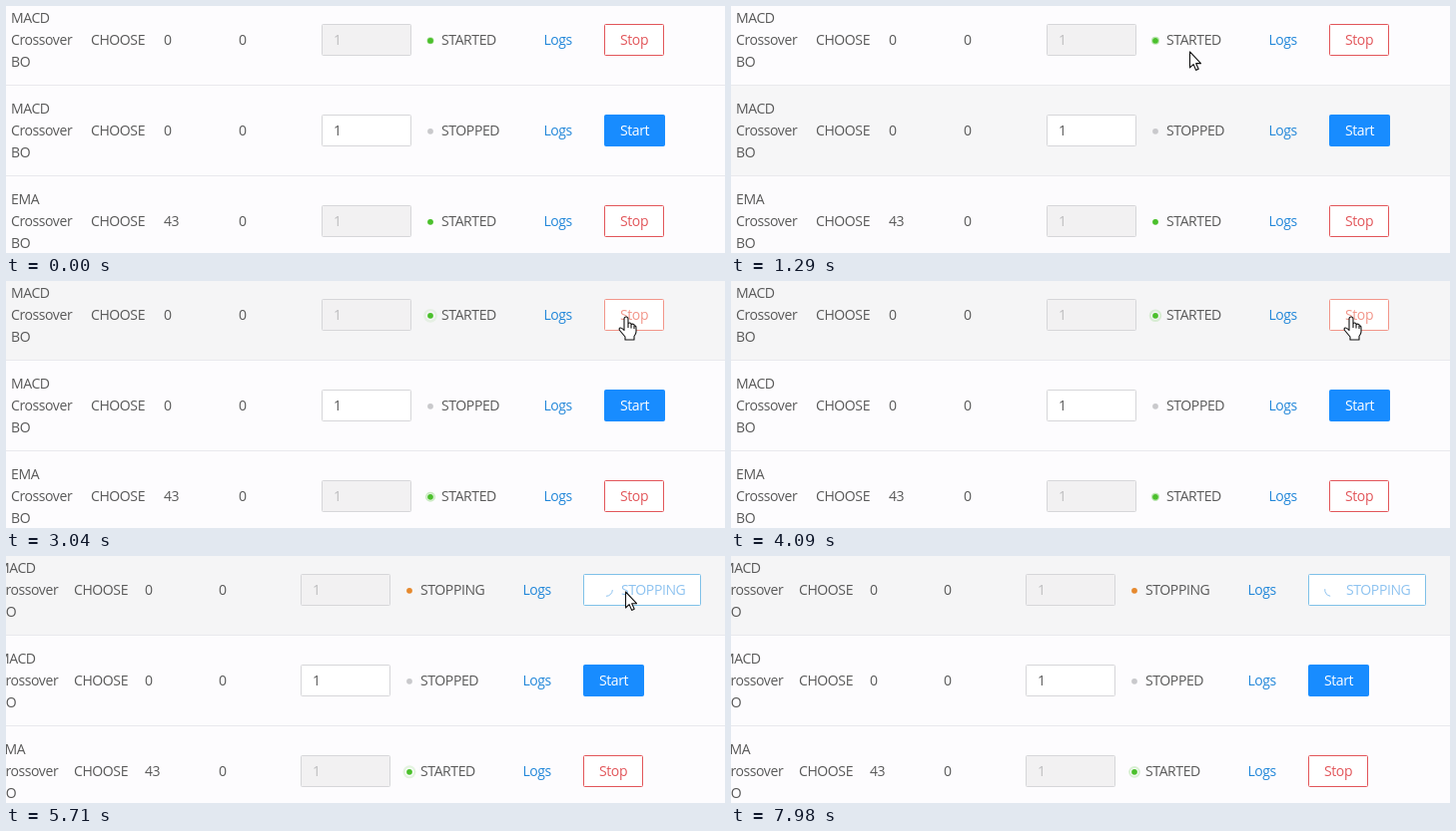
Recreate the animation shown at these times as an HTML page with a canvas. Size 720x248 px, loop 8000 ms.

```html
<!DOCTYPE html>
<html lang="en">
<head>
<meta charset="utf-8">
<title>Strategy table</title>
<style>
html, body { margin: 0; width: 100%; height: 100%; overflow: hidden; background: #fdfcfe; }
canvas { display: block; }
</style>
</head>
<body>
<canvas id="stage" width="720" height="248"></canvas>
<script>
const ctx = document.getElementById('stage').getContext('2d');
const LOOP = 8000, PITCH = 91;
const STOPPING_AT = 4860, LOADING_AT = 4940;
const INK = '#595959', LINK = '#2287d9', BLUE = '#188cff', PALE_BLUE = '#8ec3f0';
const RED = [226, 86, 90], PALE_RED = [242, 150, 138];

const rows = [
  { name: 'MACD', count: '0', on: true, phase: 380 },
  { name: 'MACD', count: '0', on: false },
  { name: 'EMA', count: '43', on: true, phase: 0 }
];

// Time, x, y of the pointer tip
const path = [
  [760, 624, 256], [840, 612, 232], [1020, 556, 165], [1290, 459, 46], [1500, 457, 40],
  [1700, 470, 39], [2070, 597, 36], [2300, 620, 36], [6650, 620, 36], [7050, 726, 48]
];
// Time, hovered row
const hovers = [[840, 2], [1020, 1], [1290, 0]];

const clamp = v => Math.min(1, Math.max(0, v));
const ramp = (t, start, span) => clamp((t - start) / span);
const smooth = v => v * v * (3 - 2 * v);
const mix = (a, b, k) => a + (b - a) * k;
const mixRgb = (a, b, k) => `rgb(${a.map((v, i) => Math.round(mix(v, b[i], k)))})`;

function text(str, x, y, color) {
  ctx.fillStyle = color;
  ctx.fillText(str, x, y);
}

function box(x, y, w, h, fill, stroke) {
  ctx.beginPath();
  ctx.roundRect(x + .5, y + .5, w - 1, h - 1, 1);
  ctx.fillStyle = fill;
  ctx.fill();
  ctx.lineWidth = 1;
  ctx.strokeStyle = stroke;
  ctx.stroke();
}

function dot(x, y, color, pulse) {
  ctx.fillStyle = ctx.strokeStyle = color;
  ctx.beginPath();
  ctx.arc(x, y, 2.9, 0, 7);
  ctx.fill();
  if (pulse === undefined) return;
  const scale = mix(.8, 2.4, smooth(pulse));
  ctx.globalAlpha = .6 * (1 - pulse);
  ctx.lineWidth = scale;
  ctx.beginPath();
  ctx.arc(x, y, 2.5 * scale, 0, 7);
  ctx.stroke();
  ctx.globalAlpha = 1;
}

function hoverLevel(row, t) {
  const i = hovers.findIndex(h => h[1] === row);
  const enter = ramp(t, hovers[i][0], 300);
  const next = hovers[i + 1];
  return next ? enter * (1 - ramp(t, next[0], 300)) : enter;
}

function pointer(t) {
  const i = path.findIndex(p => p[0] > t);
  if (i < 1) return null;
  const [t0, x0, y0] = path[i - 1], [t1, x1, y1] = path[i];
  const k = (t - t0) / (t1 - t0);
  return [mix(x0, x1, k), mix(y0, y1, k)];
}

function button(row, i, x, y, t, load) {
  const base = y + 39;
  if (i === 0 && t >= STOPPING_AT) {
    box(x, y + 18, 96 + 22 * load, 32, '#fff', '#7fc1e8');
    text('STOPPING', x + 16 + 22 * load, base, PALE_BLUE);
    if (load > 0) {
      const a = (t - 5710) / 1000 * Math.PI * 2;
      ctx.globalAlpha = load;
      ctx.strokeStyle = PALE_BLUE;
      ctx.lineWidth = 1;
      ctx.beginPath();
      ctx.arc(x + 23, y + 34, 6.3, a, a + Math.PI / 2);
      ctx.stroke();
      ctx.globalAlpha = 1;
    }
  } else if (row.on) {
    const color = mixRgb(RED, PALE_RED, i === 0 ? ramp(t, 2110, 300) : 0);
    box(x, y + 18, 60, 32, '#fff', color);
    text('Stop', x + 16, base, color);
  } else {
    box(x, y + 18, 61, 32, BLUE, BLUE);
    text('Start', x + 16, base, '#fff');
  }
}

function drawRow(row, i, t) {
  const y = i * PITCH, base = y + 39;
  const stopped = t >= STOPPING_AT, stopping = i === 0 && stopped;
  const load = smooth(ramp(t, LOADING_AT, 300));
  const col = (x, shift) => x - (stopped ? shift : 0) - 5 * load;

  ctx.fillStyle = mixRgb([253, 252, 254], [245, 245, 246], hoverLevel(i, t));
  ctx.fillRect(0, y - 11, 720, 90);
  ctx.fillStyle = '#e9e9ed';
  ctx.fillRect(0, y + 79, 720, 1);

  [row.name, 'Crossover', 'BO'].forEach((s, n) => text(s, col(5, 9), y + 17 + 22 * n, INK));
  text('CHOOSE', col(85, 12), base, INK);
  text(row.count, col(158, 14), base, INK);
  text('0', col(233, 15), base, INK);

  box(col(316, 16), y + 18, 90, 32, row.on ? '#f2f1f2' : '#fff', '#d6d6d9');
  text('1', col(328, 16), base, row.on ? '#bdbdbf' : INK);

  const color = stopping ? '#e6892e' : row.on ? '#4bc02c' : '#c9c9cc';
  const pulse = row.on && !stopping ? (t + row.phase) % 1200 / 1200 : undefined;
  dot(col(425, 16), y + 34.8, color, pulse);
  text(stopping ? 'STOPPING' : row.on ? 'STARTED' : 'STOPPED', col(436, 16), base, INK);

  text('Logs', col(538.4, 16), base, LINK);
  button(row, i, col(599, 16), y, t, load);
}

function outline(d, x, y) {
  const shape = new Path2D(d);
  ctx.save();
  ctx.translate(x, y);
  ctx.fillStyle = '#fff';
  ctx.strokeStyle = '#111';
  ctx.lineWidth = 1.1;
  ctx.lineJoin = 'round';
  ctx.fill(shape);
  ctx.stroke(shape);
  ctx.restore();
}

const ARROW = 'M.5 0V16L4.1 12.6L6.6 18.4L9.2 17.3L6.7 11.7H11.5Z';
const HAND = 'M-1 13V2Q-1 0 1 0T3 2V7.5Q3 6 4.6 6T6 8Q6.5 7 8 7.2T9 9Q11 8.5 11 11V15Q11 17 9 19.5V23H0V20L-5.5 13.5Q-6.5 11.5-5 11T-1 13.5ZM3 7V11M6 8V11.5M9 9V12';

function frame() {
  const t = performance.now() % LOOP;
  ctx.font = '14px "Open Sans", "Noto Sans", sans-serif';
  ctx.letterSpacing = '-0.4px';
  rows.forEach((row, i) => drawRow(row, i, t));

  const p = pointer(t);
  if (p) {
    const hand = p[0] >= 599 && p[1] < 50 && t < STOPPING_AT;
    outline(hand ? HAND : ARROW, p[0], p[1]);
  }
  requestAnimationFrame(frame);
}
frame();
</script>
</body>
</html>
```
